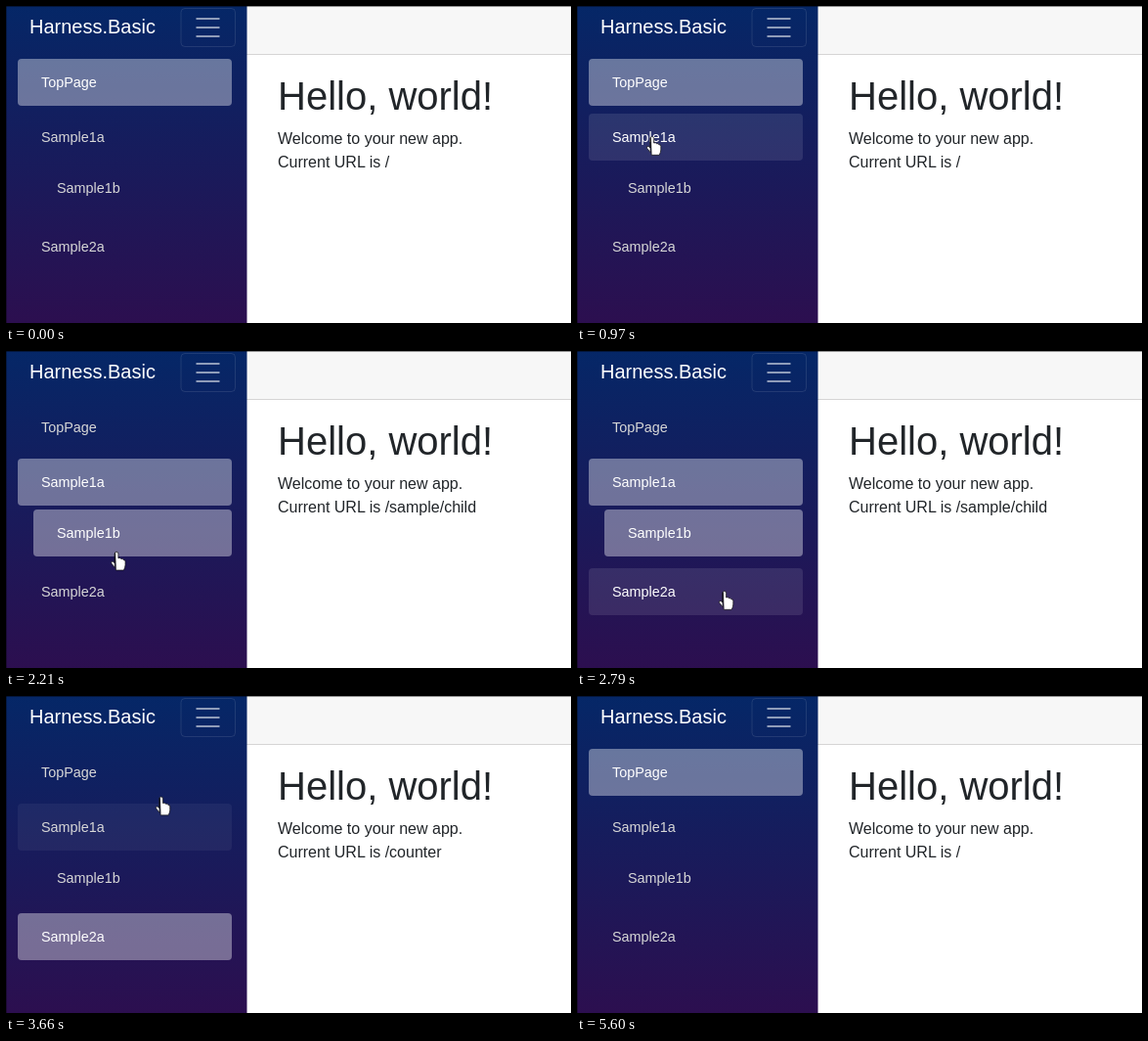
Write an HTML page that moves like this. It is 578 px wide and 324 px high and loops after 5700 ms.

```html
<!DOCTYPE html>
<html lang="en">
<head>
<meta charset="utf-8">
<title>Navigation demo</title>
<style>
  html, body { margin: 0; width: 100%; height: 100%; overflow: hidden; background: #fff; }
  svg { display: block; font: 16px "Liberation Sans", Arial, sans-serif; }
  .nav { font-size: 14.4px; }
  .cursor { stroke: #111; stroke-width: .7; fill: #fff; stroke-linejoin: round; }
</style>
</head>
<body>
<svg width="578" height="324" viewBox="0 0 578 324">
  <defs>
    <linearGradient id="side" gradientUnits="userSpaceOnUse" x1="0" y1="0" x2="0" y2="440">
      <stop stop-color="#052767"/>
      <stop offset="1" stop-color="#3a0647"/>
    </linearGradient>
  </defs>
  <rect width="578" height="324" fill="#fff"/>
  <rect x="246" width="332" height="49" fill="#f7f7f7"/>
  <rect x="246" y="49" width="332" height="1" fill="#d6d5d5"/>
  <rect width="246.5" height="324" fill="url(#side)"/>
  <rect width="578" height="1" opacity=".4"/>
  <rect width="1" height="324" opacity=".3"/>

  <text x="24" y="28" font-size="20" fill="#fff">Harness.Basic</text>
  <rect x="179" y="2.5" width="55.5" height="39" rx="4" fill="none" stroke="#fff" stroke-opacity=".1"/>
  <path d="M194.5 13h24M194.5 22h24M194.5 31h24" stroke="#fff" stroke-opacity=".55" stroke-width="2"/>
  <g id="nav" class="nav"></g>

  <g fill="#212529">
    <text x="278" y="105.5" font-size="40">Hello, world!</text>
    <text x="278" y="141">Welcome to your new app.</text>
    <text id="url" x="278" y="165"></text>
  </g>

  <g id="cursor" class="cursor">
    <path id="arrow" d="M0 0V12.5L2.8 10 4.8 14.5 6.8 13.6 4.8 9.2H8.5Z"/>
    <path id="hand" d="M-2 1.5Q-2-.5-.2-.5T1.6 1.5V6Q3.8 5 4.4 6.8 6.4 6 6.8 7.8 8.8 7.4 8.8 9.5V13Q8.6 15.5 7.2 18.3H-.8Q-2-15.6-2 15.6L-5.4 11.2Q-6 9.2-4 9.4L-2 11Z"/>
  </g>
</svg>
<script>
const LOOP = 5700, LAG = 70, RIGHT = 231;
const $ = id => document.getElementById(id);

// Screen refreshes: first time, last time, count
const refreshes = [
  [0, 0, 1], [200, 670, 7], [780, 1340, 7], [1440, 1620, 3], [1810, 1830, 2],
  [2020, 2210, 3], [2390, 2880, 7], [2980, 3070, 2], [3220, 3760, 7], [3880, 3880, 1], [4050, 4440, 5]
].flatMap(([from, to, n]) =>
  Array.from({ length: n }, (_, i) => from + (to - from) * i / Math.max(1, n - 1)));

// Pages: time, URL, active items, highlight opacity
const pages = [
  [0, "/", [0], .38],
  [1060, "/sample", [1], .38],
  [1810, "/sample/child", [1, 2], .38],
  [3220, "/counter", [3], .38],
  [4050, "/", [0], .14],
  [4300, "/", [0], .38]
];

// Pointer moves: start, end, target x, target y
const start = [270, 152], visible = [270, 4430];
const moves = [
  [200, 670, 77, 134],
  [1150, 1440, 91, 182],
  [2020, 2480, 151, 246],
  [3260, 3780, 160, 85],
  [4080, 4400, 304, 138]
];

const items = [["TopPage", 12, 54], ["Sample1a", 12, 110], ["Sample1b", 28, 162], ["Sample2a", 12, 222]]
  .map(([label, x, y]) => {
    const add = (tag, attrs) => {
      const el = document.createElementNS("http://www.w3.org/2000/svg", tag);
      for (const key in attrs) el.setAttribute(key, attrs[key]);
      return $("nav").appendChild(el);
    };
    const box = add("rect", { x, y, width: RIGHT - x, height: 48, rx: 4, fill: "#fff" });
    const text = add("text", { x: x + 24, y: y + 29 });
    text.textContent = label;
    return { x, y, box, text };
  });

function pointerAt(t) {
  let [x, y] = start;
  for (const [from, to, tx, ty] of moves) {
    const u = Math.min(1, Math.max(0, (t - from) / (to - from)));
    const s = u * u * (3 - 2 * u);
    x += (tx - x) * s;
    y += (ty - y) * s;
  }
  return [x, y];
}

function draw(t) {
  const [, url, active, strength] = pages.findLast(p => p[0] <= t + 1);
  const shown = t >= visible[0] && t < visible[1];
  const [x, y] = pointerAt(t), [hx, hy] = pointerAt(t - LAG);
  const inside = (item, px, py) => px >= item.x && px < RIGHT && py >= item.y && py < item.y + 48;
  const hovered = shown ? items.find(item => inside(item, hx, hy)) : null;

  items.forEach((item, i) => {
    const isActive = active.includes(i), isHovered = item === hovered;
    const hover = !isHovered ? 0 : inside(item, x, y) ? .1 : .05;
    item.box.setAttribute("opacity", isActive ? strength : hover);
    item.text.setAttribute("fill", isActive || hover === .1 ? "#fff" : "#d7d7d7");
  });
  $("url").textContent = "Current URL is " + url;

  const overLink = hovered && x < RIGHT;
  $("cursor").setAttribute("visibility", shown ? "visible" : "hidden");
  $("cursor").setAttribute("transform", `translate(${x} ${y})`);
  $("hand").style.display = overLink ? "" : "none";
  $("arrow").style.display = overLink ? "none" : "";
}

function tick() {
  const t = performance.now() % LOOP;
  draw(refreshes.findLast(r => r <= t + 15));
  requestAnimationFrame(tick);
}
tick();
</script>
</body>
</html>
```
